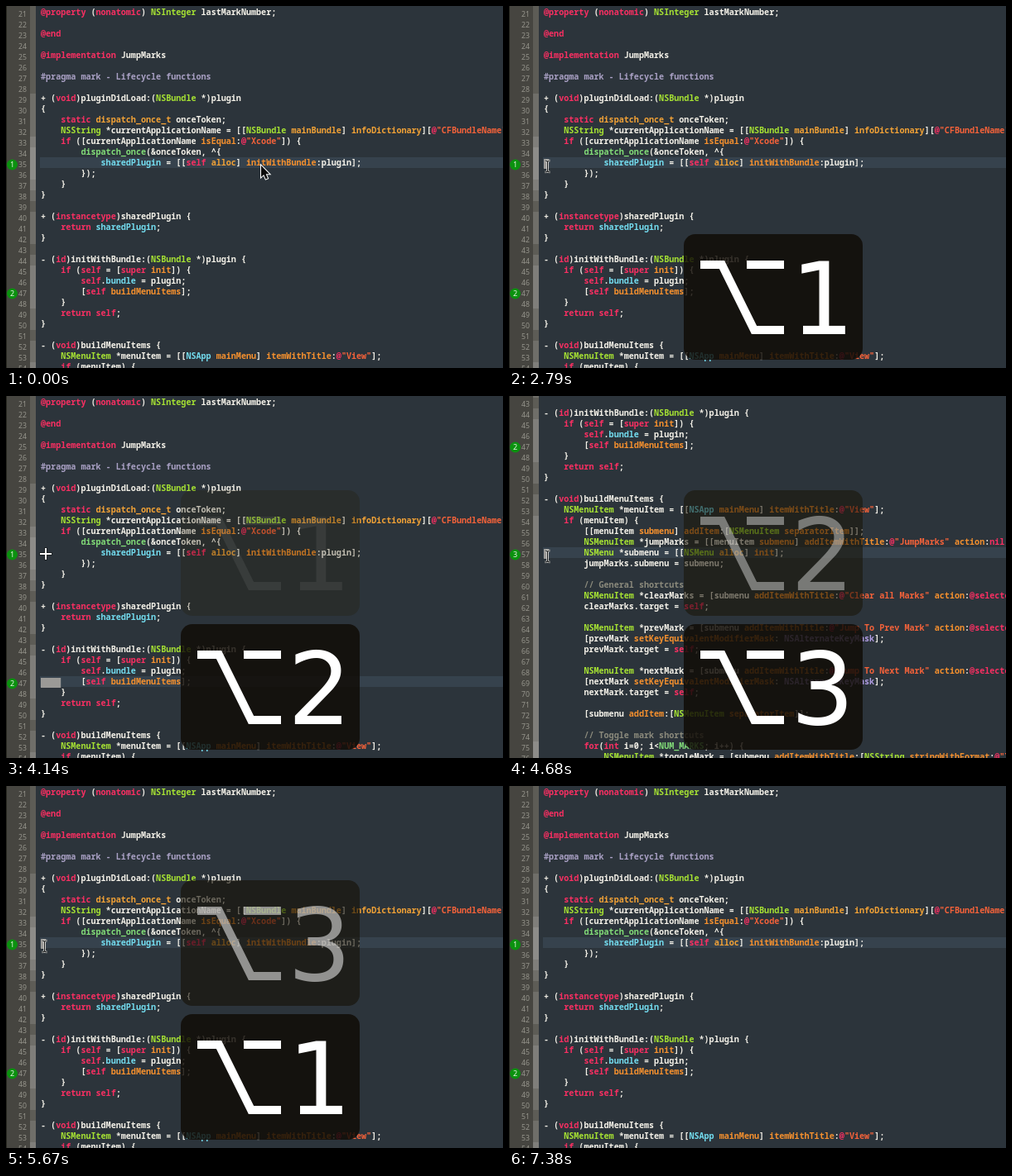
Write an HTML page with a canvas that moves like this. It is 600 px wide and 438 px high and loops after 7470 ms.

```html
<!DOCTYPE html>
<html lang="en">
<head>
<meta charset="utf-8">
<title>Jumping between marks</title>
<style>
  html, body { margin: 0; width: 100%; height: 100%; overflow: hidden; background: #2c343b; }
  canvas { display: block; }
</style>
</head>
<body>
<canvas id="stage" width="600" height="438"></canvas>
<script>
const ctx = document.getElementById('stage').getContext('2d');

const LOOP = 7470, STEP = 90;
const FIRST_LINE = 21, PITCH = 13, ANCHOR_Y = 193;
const CODE_X = 42, FONT_SIZE = 10.08, ADVANCE = FONT_SIZE * 0.6;
const CODE_FONT = `600 ${FONT_SIZE}px "Noto Sans Mono", monospace`;

const SOURCE = String.raw`@property (nonatomic) NSInteger lastMarkNumber;

@end

@implementation JumpMarks

#pragma mark - Lifecycle functions

+ (void)pluginDidLoad:(NSBundle *)plugin
{
    static dispatch_once_t onceToken;
    NSString *currentApplicationName = [[NSBundle mainBundle] infoDictionary][@"CFBundleName"];
    if ([currentApplicationName isEqual:@"Xcode"]) {
        dispatch_once(&onceToken, ^{
            sharedPlugin = [[self alloc] initWithBundle:plugin];
        });
    }
}

+ (instancetype)sharedPlugin {
    return sharedPlugin;
}

- (id)initWithBundle:(NSBundle *)plugin {
    if (self = [super init]) {
        self.bundle = plugin;
        [self buildMenuItems];
    }
    return self;
}

- (void)buildMenuItems {
    NSMenuItem *menuItem = [[NSApp mainMenu] itemWithTitle:@"View"];
    if (menuItem) {
        [[menuItem submenu] addItem:[NSMenuItem separatorItem]];
        NSMenuItem *jumpMarks = [[menuItem submenu] addItemWithTitle:@"JumpMarks" action:nil keyEquivalent:@""];
        NSMenu *submenu = [[NSMenu alloc] init];
        jumpMarks.submenu = submenu;

        // General shortcuts
        NSMenuItem *clearMarks = [submenu addItemWithTitle:@"Clear all Marks" action:@selector(clearMarks)
        clearMarks.target = self;

        NSMenuItem *prevMark = [submenu addItemWithTitle:@"Jump To Prev Mark" action:@selector(prevMark)
        [prevMark setKeyEquivalentModifierMask: NSAlternateKeyMask];
        prevMark.target = self;

        NSMenuItem *nextMark = [submenu addItemWithTitle:@"Jump To Next Mark" action:@selector(nextMark)
        [nextMark setKeyEquivalentModifierMask: NSAlternateKeyMask];
        nextMark.target = self;

        [submenu addItem:[NSMenuItem separatorItem]];

        // Toggle mark shortcuts
        for(int i=0; i<NUM_MARKS; i++) {
            NSMenuItem *toggleMark = [submenu addItemWithTitle:[NSString stringWithFormat:@"Toggle Mark %d"`.split('\n');

// The first rule that matches at a position colours the token.
const RULES = [
  [/^#pragma.*/, '#a9a0c4'],
  [/^\/\/.*/, '#8b8a7c'],
  [/^"[^"]*"?/, '#f4623a'],
  [/^@\w*|^(static|if|return|self|super|for|int|void|id|instancetype|nonatomic|nil)\b/, '#f92f62'],
  [/^(NSApp|sharedPlugin|bundle)\b/, '#73dcef'],
  [/^NSAlternateKeyMask\b/, '#ae9be0'],
  [/^(dispatch_once|NUM_MARKS)\b/, '#82dc78'],
  [/^NS[A-Z]\w*/, '#a6e233'],
  [/^(infoDictionary|mainBundle|alloc|dispatch_once_t)\b/, '#f2a236'],
  [/^(isEqual|init|initWithBundle|buildMenuItems|mainMenu|itemWithTitle|addItem|separatorItem|addItemWithTitle|action|setKeyEquivalentModifierMask|stringWithFormat)\b|^submenu(?=])/, '#f5902e'],
  [/^\w+|^[^\w\s]|^\s+/, '#f4f1e8']
];
const PLAIN = RULES.at(-1)[1];
const DECLARED = /^(initWithBundle|buildMenuItems|sharedPlugin)$/;

function tokenize(line) {
  const tokens = [], declaration = /^[-+]/.test(line);
  for (let col = 0; col < line.length;) {
    const rest = line.slice(col);
    const [pattern, color] = RULES.find(([p]) => p.test(rest));
    const text = rest.match(pattern)[0];
    tokens.push({ text, col, color: declaration && DECLARED.test(text) ? PLAIN : color });
    col += text.length;
  }
  return tokens;
}
const LINES = SOURCE.map(tokenize);

const FOLDS = [[29, 38], [33, 37], [34, 36], [40, 42], [44, 50], [45, 48], [52, 90], [54, 90], [75, 90]];
const MARKS = { 1: 35, 2: 47, 3: 57 };

// Each shortcut jumps to its mark; `top` is the line at the anchor height.
const JUMPS = [
  { at: 2580, key: 1, top: 35, caret: 1 },
  { at: 3510, key: 2, top: 35, caret: 4 },
  { at: 4590, key: 3, top: 57, caret: 1 },
  { at: 5490, key: 1, top: 35, caret: 1 }
];
const HOLD = 800, FADE = 1080, IDLE_AT = 6750;

const clamp = v => Math.min(1, Math.max(0, v));
const ease = v => v * v * (3 - 2 * v);

function rect(x, y, w, h, color) {
  ctx.fillStyle = color;
  ctx.fillRect(x, y, w, h);
}

function text(str, x, y, font, color, align = 'left') {
  ctx.font = font;
  ctx.fillStyle = color;
  ctx.textAlign = align;
  ctx.fillText(str, x, y);
}

function drawEditor(top, current, caret) {
  const lineY = n => ANCHOR_Y + (n - top) * PITCH;
  rect(0, 0, 600, 438, '#2c343b');
  rect(CODE_X - 1, lineY(current) - 10, 560, PITCH, '#36424d');
  rect(0, 0, 29, 438, '#464540');
  rect(0, 0, 1, 438, '#26261f');
  rect(29, 0, 7, 438, '#5d5c56');
  for (const [from, to] of FOLDS)
    rect(29, lineY(from) - 9, 7, (to - from + 1) * PITCH, 'rgba(255,255,255,.11)');
  if (caret) rect(CODE_X, lineY(current) - 8, caret * ADVANCE, 12, '#9b9a97');

  for (const [key, line] of Object.entries(MARKS)) {
    const y = lineY(line) - 1;
    ctx.fillStyle = '#0b920f';
    ctx.beginPath();
    ctx.arc(7.5, y, 6.5, 0, 7);
    ctx.fill();
    text(key, 7.5, y + 3.3, '9px "Noto Sans", sans-serif', '#e8f5e4', 'center');
  }

  LINES.forEach((tokens, i) => {
    const line = FIRST_LINE + i, y = lineY(line);
    if (y < -5 || y > 450) return;
    text(line, 25, y + 1.5, '8.7px "Noto Sans", sans-serif', '#96958c', 'right');
    for (const t of tokens) text(t.text, CODE_X + t.col * ADVANCE, y, CODE_FONT, t.color);
  });
}

// Shortcut panel: option symbol and digit. The background warms as it fades,
// and the symbols fade faster than the background.
function drawPanel(key, dy, opacity) {
  const mix = (solid, faded) => faded + (solid - faded) * opacity;
  ctx.save();
  ctx.translate(0, dy);
  ctx.globalAlpha = 0.83 * opacity;
  ctx.fillStyle = `rgb(${mix(16, 40)},${mix(12, 32)},${mix(6, 2)})`;
  ctx.beginPath();
  ctx.roundRect(211, 276, 216, 152, 14);
  ctx.fill();
  ctx.globalAlpha = opacity ** 2.2;
  ctx.strokeStyle = '#fff';
  ctx.lineWidth = 10;
  ctx.stroke(new Path2D('M231 313H257L296 392H332M287 313H332'));
  text(key, 340, 397, '121px "DejaVu Sans", sans-serif', '#fff');
  ctx.restore();
}

function outlined(path, fill, stroke, width) {
  ctx.strokeStyle = stroke;
  ctx.lineWidth = width;
  ctx.stroke(path);
  ctx.fillStyle = fill;
  ctx.fill(path);
}

function drawPointer(shape, x, y) {
  ctx.save();
  ctx.translate(x, y);
  if (shape === 'arrow') {
    outlined(new Path2D('M0 0V14L3.2 11L5.6 16.5L8 15.4L5.7 10.2H10Z'), '#0a0a0a', '#fff', 2);
  } else if (shape === 'cross') {
    outlined(new Path2D('M-7 -1H-1V-7H1V-1H7V1H1V7H-1V1H-7Z'), '#fff', '#15191b', 1.4);
  } else {
    const beam = new Path2D('M-3 -7Q0 -7 0 -5Q0 -7 3 -7M0 -5V5M-3 7Q0 7 0 5Q0 7 3 7');
    for (const [color, width] of [['#e8e8e4', 2.6], ['#17191a', 1.1]]) {
      ctx.strokeStyle = color;
      ctx.lineWidth = width;
      ctx.stroke(beam);
    }
  }
  ctx.restore();
}

function drawMouse(t) {
  if (t >= IDLE_AT) return;
  if (t < 1710) {
    const k = ease(clamp((t - 90) / 1000));
    drawPointer('arrow', 308 - 260 * k, 193 - 9 * k);
  } else if (JUMPS.slice(1).some(j => t < j.at && t >= j.at - 450)) {
    drawPointer('cross', 48, 191);
  } else {
    drawPointer('beam', 46.5, 194);
  }
}

function draw(t) {
  const done = JUMPS.filter(j => t >= j.at);
  const last = done.at(-1) || { key: 1, top: 35, caret: 0 };
  drawEditor(last.top, MARKS[last.key], t < IDLE_AT ? last.caret : 0);
  done.forEach((jump, i) => {
    const opacity = 1 - clamp((t - jump.at - HOLD) / FADE);
    if (opacity > 0) drawPanel(jump.key, -162 * (done.length - 1 - i), opacity);
  });
  drawMouse(t);
}

const start = performance.now();
function frame() {
  const t = (performance.now() - start) % LOOP;
  draw(Math.floor(t / STEP) * STEP);
  requestAnimationFrame(frame);
}
frame();
</script>
</body>
</html>
```
